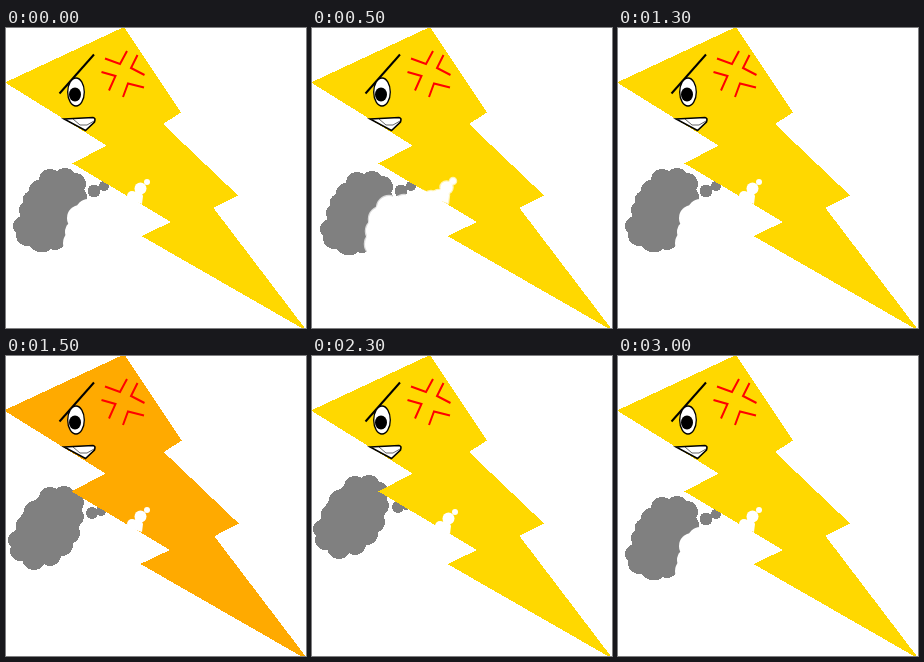
An HTML page for the animation above (3.5 s loop, 300 px wide and 300 px high).

```html
<!DOCTYPE html>
<html lang="en">
<head>
<meta charset="utf-8">
<title>Angry bolt</title>
<style>
  html, body { margin: 0; width: 100%; height: 100%; overflow: hidden; background: #fff; }
  svg { display: block; width: 100vw; height: 100vh; }
  .pose { visibility: hidden; animation: 3500ms step-end infinite; }
  .rest { animation-name: rest; }
  .low { animation-name: low; }
  .mid { animation-name: mid; }
  .high { animation-name: high; }
  .bolt { fill: #ffd800; shape-rendering: crispEdges; animation: heat 3500ms step-end infinite; }
  .smoke { fill: #808080; shape-rendering: crispEdges; }
  .steam { fill: #fff; }
  .steam .low { stroke: rgba(255, 255, 255, .7); stroke-width: 2.5; }
  .line { fill: none; stroke: #000; stroke-width: 2; }
  .rage { fill: none; stroke: #f00; stroke-width: 2; }

  @keyframes rest {
    0%, 28.5714%, 85.7142% { visibility: visible; }
    14.2857%, 42.8571% { visibility: hidden; }
    100% { visibility: visible; }
  }
  @keyframes low {
    0%, 28.5714%, 100% { visibility: hidden; }
    14.2857% { visibility: visible; }
  }
  @keyframes mid {
    0%, 57.1428%, 85.7142%, 100% { visibility: hidden; }
    42.8571%, 71.4285% { visibility: visible; }
  }
  @keyframes high {
    0%, 71.4285%, 100% { visibility: hidden; }
    57.1428% { visibility: visible; }
  }
  @keyframes heat {
    0%, 57.1428%, 85.7142%, 100% { fill: #ffd800; stroke: none; }
    42.8571%, 71.4285% { fill: #fa0; stroke: #fa0; }
  }
</style>
</head>
<body>
<svg viewBox="0 0 300 300">
  <defs>
    <g id="puff">
      <path d="M22 150L36 138 62 133 75 143 76 162 69 184 52 203 28 210 10 200 8 178 15 160Z"/>
      <circle cx="44" cy="142" r="11"/><circle cx="58" cy="141" r="11"/>
      <circle cx="68" cy="147" r="10"/><circle cx="68" cy="161" r="10"/>
      <circle cx="63" cy="177" r="11"/><circle cx="56" cy="189" r="11"/>
      <circle cx="44" cy="199" r="11"/><circle cx="28" cy="202" r="12"/>
      <circle cx="14" cy="195" r="10"/><circle cx="11" cy="184" r="9"/>
      <circle cx="20" cy="169" r="10"/><circle cx="28" cy="155" r="10"/>
    </g>
    <g id="plume">
      <path d="M27 158L42 146 62 143 76 152 74 170 68 205 50 219 28 222 13 208 14 186 22 170Z"/>
      <circle cx="44" cy="152" r="11"/><circle cx="59" cy="151" r="11"/>
      <circle cx="69" cy="156" r="11"/><circle cx="70" cy="169" r="11"/>
      <circle cx="62" cy="186" r="12"/><circle cx="49" cy="211" r="11"/>
      <circle cx="36" cy="212" r="12.500"/><circle cx="21" cy="207" r="11"/>
      <circle cx="17" cy="198" r="10"/><circle cx="23" cy="182" r="10"/>
      <circle cx="33" cy="162" r="10"/><circle cx="25" cy="171" r="8"/>
    </g>
    <g id="wisp">
      <circle cx="126" cy="168" r="5"/>
      <path d="M122 167L134 161 137 168 136 176 126 173Z"/>
      <circle cx="134.500" cy="160.500" r="6"/><circle cx="141" cy="154" r="3"/>
    </g>
  </defs>

  <g class="smoke">
    <g class="pose rest">
      <use href="#plume"/>
      <circle cx="88" cy="163" r="6.500"/><circle cx="98" cy="158" r="5"/>
    </g>
    <g class="pose low">
      <use href="#plume" x="1" y="3"/>
      <circle cx="89" cy="163" r="6.500"/><circle cx="99" cy="158" r="5"/>
    </g>
    <g class="pose mid">
      <use href="#puff"/>
      <circle cx="86" cy="157" r="6"/><circle cx="95" cy="155" r="5"/>
    </g>
    <g class="pose high">
      <use href="#puff" x="-1" y="-11"/>
      <circle cx="86" cy="151" r="6"/><circle cx="94" cy="149" r="5"/>
    </g>
  </g>

  <path class="bolt" d="M-1 54.500L118 -1 175 84.500 157 96 232 167.500 207.500 180 301 303 135.500 208 165 194 66.500 135.500 100.500 117.500Z"/>

  <g class="steam">
    <g class="pose rest">
      <path d="M80 176L100 180 125 168 125 220 70 222 66 190Z"/>
      <circle cx="82" cy="183" r="12"/><circle cx="74" cy="190" r="13"/>
      <circle cx="71" cy="204" r="12"/><circle cx="70" cy="215" r="13"/>
      <use href="#wisp"/>
    </g>
    <g class="pose low">
      <path d="M65 185L90 177 118 170 125 170 125 235 62 230Z"/>
      <circle cx="66" cy="216" r="13"/><circle cx="66" cy="203" r="12"/>
      <circle cx="69" cy="191" r="12"/><circle cx="77" cy="180" r="12"/>
      <circle cx="92" cy="178" r="11"/><circle cx="107" cy="173" r="11"/>
      <circle cx="119" cy="171" r="8"/>
      <use href="#wisp" y="-1"/>
    </g>
    <use class="pose mid" href="#wisp"/>
    <use class="pose high" href="#wisp" x="2" y="2"/>
  </g>

  <path class="line" d="M53.500 65.500L88 26.500"/>
  <ellipse cx="70" cy="64" rx="8.300" ry="14" fill="#fff" stroke="#000" stroke-width="1.300"/>
  <ellipse cx="69" cy="66.500" rx="6" ry="7"/>
  <path d="M58 91L87 89.500Q90 90 88.500 94L79.500 102.500Z" fill="#fff" stroke="#000" stroke-width="1.600"/>
  <path class="line" style="stroke-width:.6" d="M67 91L74 97 81 97 88 93"/>
  <path class="rage" d="M99 30.500L114 36 121 23M131.500 27L125 40 138.500 47M95.500 44L109.500 48 103 62.500M117 69L122 55.500 138 59.500"/>
</svg>
</body>
</html>
```
